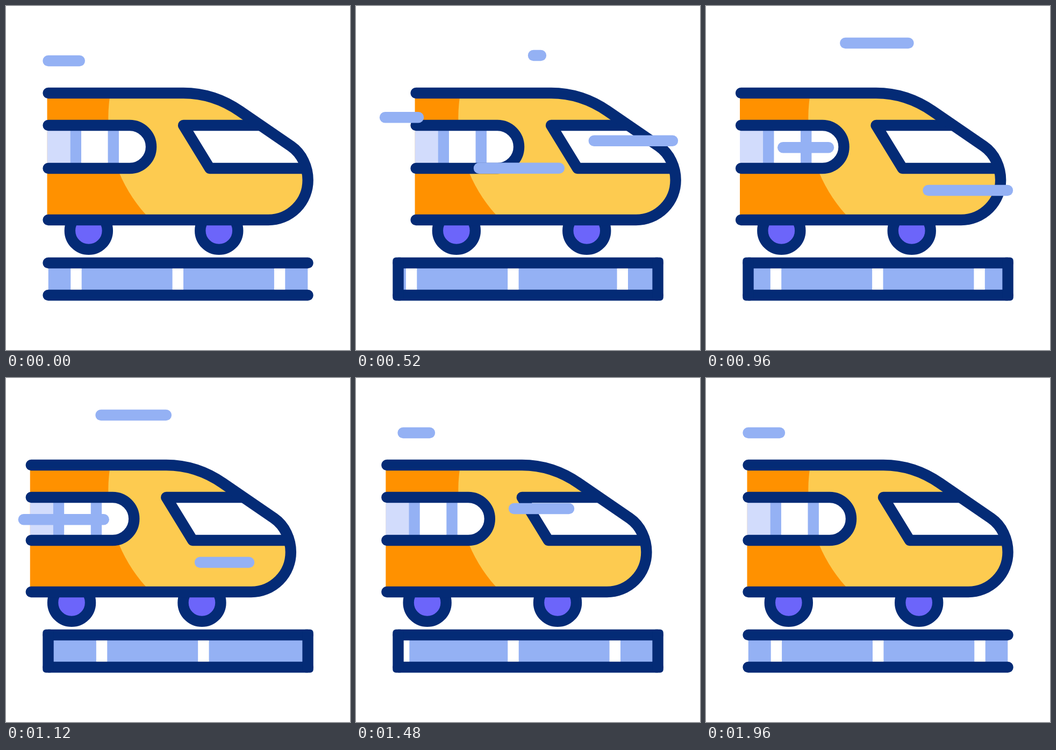
An HTML page with a canvas that plays this animation: 640 by 640 pixels, repeating every 2000 ms.

```html
<!DOCTYPE html>
<html lang="en">
<head>
<meta charset="utf-8">
<title>Train</title>
<style>
  html, body { margin: 0; height: 100%; overflow: hidden; background: #fff; }
  canvas { display: block; }
</style>
</head>
<body>
<canvas id="stage" width="640" height="640"></canvas>
<script>
const ctx = document.getElementById('stage').getContext('2d');
const LOOP = 2000, STROKE = 20.4;
const NAVY = '#042b76', BLUE = '#94b1f4', PALE = '#d2dcfc';
const YELLOW = '#fdcb50', ORANGE = '#ff9100', PURPLE = '#6c65fa', WHITE = '#fff';

const left = 78.5, right = 561.6, bodyLeft = 76.5;
const railTop = 478, railGap = 60;

const roof = 'H330C367.6 162 404 174.2 435 195.5L530.5 261';
const nose = 'C550.5 274.8 561.6 299.7 561.6 324A73.8 73.8 0 0 1 488 398';
const bay = 'H230A40 40 0 0 1 230 302H';
const outline = new Path2D(`M${left} 162${roof}${nose}H${left}`);
const body = new Path2D(`M${bodyLeft} 162${roof}${nose}H${bodyLeft}Z`);
const sideWindow = new Path2D(`M${left} 222${bay}${left}`);
const sideGlass = new Path2D(`M${bodyLeft} 222${bay}${bodyLeft}Z`);
const screen = new Path2D('M472 222H330L379 302H557');
const screenGlass = new Path2D('M330 222H474L530.5 261Q550 275 557 302H379Z');

const clamp = v => Math.min(1, Math.max(0, v));
const ramp = (t, start, span) => clamp((t - start) / span);
const smooth = u => u * u * (3 - 2 * u);

// forward, back past the rest position, then home
const sway = t => 34.4 * ramp(t, 0, 542) - 72.3 * ramp(t, 542, 633) + 37.9 * ramp(t, 1175, 693);

function fill(path, color) {
  ctx.fillStyle = color;
  ctx.fill(path);
}

function rect(color, x, y, w, h) {
  ctx.fillStyle = color;
  ctx.fillRect(x, y, w, h);
}

function circle(x, y, r) {
  const path = new Path2D();
  path.arc(x, y, r, 0, 2 * Math.PI);
  return path;
}

function line(color, x1, x2, y) {
  ctx.strokeStyle = color;
  ctx.beginPath();
  ctx.moveTo(x1, y);
  ctx.lineTo(x2, y);
  ctx.stroke();
}

function wheel(x) {
  const rim = circle(x, 417.9, 35);
  fill(rim, PURPLE);
  ctx.strokeStyle = NAVY;
  ctx.stroke(rim);
}

function drawTrain(dx) {
  ctx.save();
  ctx.translate(dx, 0);
  wheel(153.8);
  wheel(396.2);

  // the shading edge stays still while the body moves
  ctx.save();
  ctx.clip(body);
  rect(ORANGE, 70, 150, 500, 260);
  fill(circle(457.3 - dx, 208, 267), YELLOW);
  ctx.restore();

  fill(sideGlass, WHITE);
  rect(PALE, bodyLeft, 222, 43, 80);
  for (const x of [119.5, 189.5]) rect(BLUE, x, 222, STROKE, 80);
  fill(screenGlass, WHITE);

  ctx.strokeStyle = NAVY;
  for (const path of [sideWindow, screen, outline]) ctx.stroke(path);
  ctx.restore();
}

function drawTrack(t) {
  const shift = 1164 * smooth(ramp(t, -20, 1960));
  ctx.save();
  ctx.beginPath();
  ctx.rect(left, railTop, right - left, railGap);
  ctx.clip();
  rect(BLUE, left, railTop, right - left, railGap);
  for (let i = 0; i < 12; i++) {
    const tile = Math.floor(i / 3);
    rect(WHITE, 120.7 + tile * 582 + i % 3 * 189.3 - shift, railTop, STROKE, railGap);
  }
  ctx.restore();

  for (const y of [railTop, railTop + railGap]) line(NAVY, left, right, y);
  if (t < 20 || t > 1940) return;
  for (const x of [left, right]) {
    const end = new Path2D();
    end.roundRect(x - STROKE / 2, railTop - STROKE / 2, STROKE, railGap + STROKE, 6);
    fill(end, NAVY);
  }
}

// a streak grows leftward from x, then its tail follows after the hold
function wind(t, y, x, start, length = 200, hold = 216) {
  for (const time of [t, t + LOOP]) {
    const head = ramp(time, start, 290), tail = ramp(time, start + hold, 290);
    if (head > tail) line(BLUE, x - tail * length, x - head * length, y);
  }
}

function drawWinds(t) {
  wind(t, 92, 555, 41, 225, 208);
  wind(t, 207.3, 254, 105);
  wind(t, 301.7, 420, 244);
  wind(t, 250.8, 589, 309);
  wind(t, 343, 561, 747);
  wind(t, 69, 376.5, 791);
  wind(t, 263.3, 228, 838);
  wind(t, 243, 494, 1123);
  wind(t, 102, 137, 1236, 58.5, 764);
}

function draw() {
  const t = performance.now() % LOOP;
  rect(WHITE, 0, 0, 640, 640);
  ctx.lineWidth = STROKE;
  ctx.lineCap = ctx.lineJoin = 'round';
  drawTrack(t);
  drawTrain(sway(t));
  drawWinds(t);
  requestAnimationFrame(draw);
}
draw();
</script>
</body>
</html>
```
